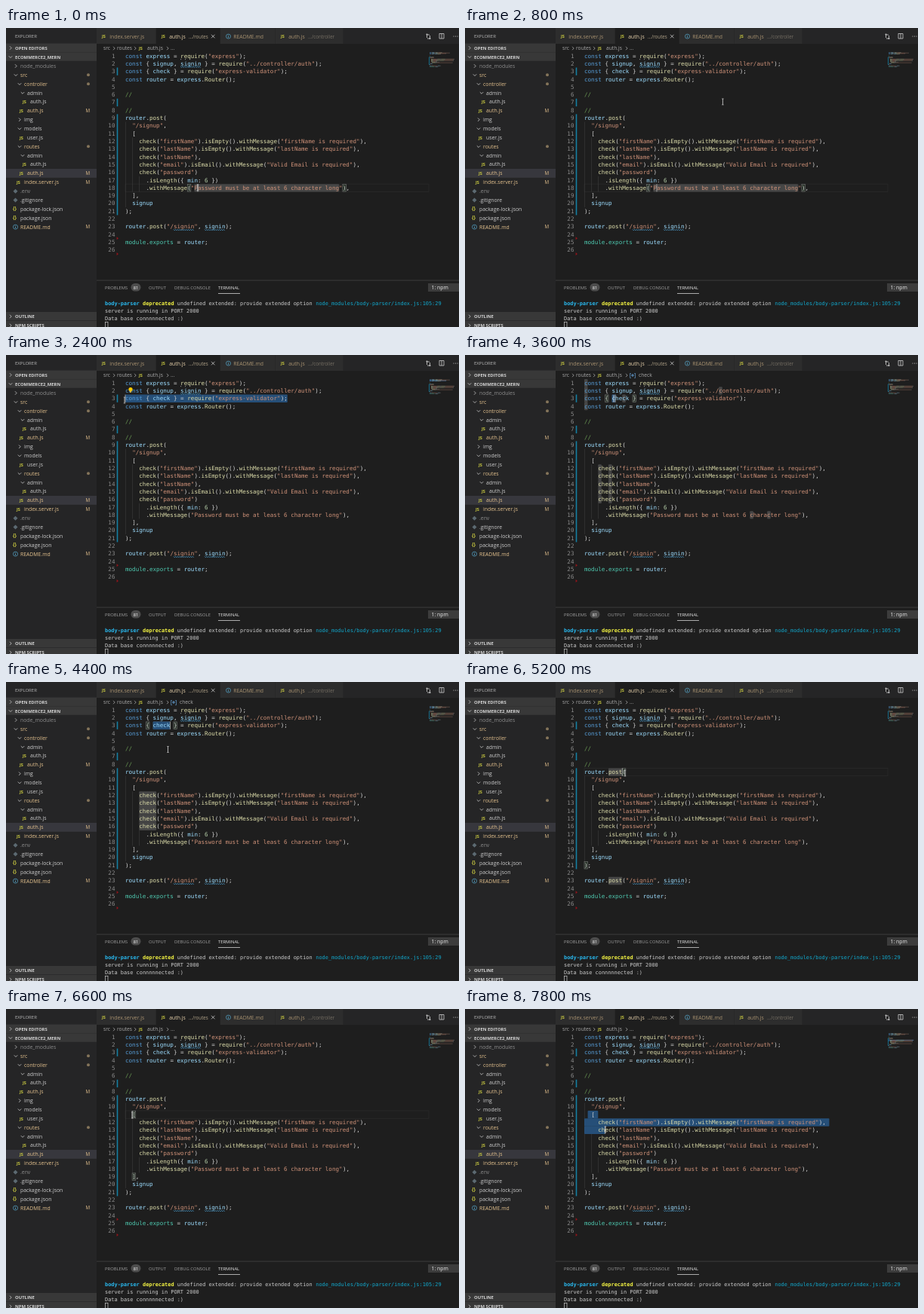
Write an HTML page with a canvas that moves like this. It is 600 px wide and 397 px high and loops after 8 s.

```html
<!DOCTYPE html>
<html lang="en">
<head>
<meta charset="utf-8">
<title>Code editor</title>
<style>
  html, body { margin: 0; width: 100%; height: 100%; overflow: hidden; background: #1e1e1e; }
  canvas { display: block; }
</style>
</head>
<body>
<canvas id="stage" width="600" height="397"></canvas>
<script>
const ctx = document.getElementById('stage').getContext('2d');
const DURATION = 8000, STEP = 200;
const UI = '"Open Sans", sans-serif', MONO = '"DejaVu Sans Mono", monospace';
const CODE_X = 158, CODE_Y = 31.9, CHAR = 4.57, LINE = 10.31, CODE_SIZE = 7.591;
const ORANGE = '#e2c08d', GREY = '#cccccc', DIM = '#8c8c8c', YELLOW = '#cbcb41', BLUE = '#519aba';

const code = `const express = require("express");
const { signup, signin } = require("../controller/auth");
const { check } = require("express-validator");
const router = express.Router();

//

//
router.post(
  "/signup",
  [
    check("firstName").isEmpty().withMessage("firstName is required"),
    check("lastName").isEmpty().withMessage("lastName is required"),
    check("lastName"),
    check("email").isEmail().withMessage("Valid Email is required"),
    check("password")
      .isLength({ min: 6 })
      .withMessage("Password must be at least 6 character long"),
  ],
  signup
);

router.post("/signin", signin);

module.exports = router;
`.split('\n');

// Each row: indent x, name, kind, status (M = changed file, dot = changed folder)
const tree = [
  [19, 'node_modules', 'closed', 'ignored'], [19, 'src', 'open', 'dot'],
  [24, 'controller', 'open', 'dot'], [28, 'admin', 'open'], [32, 'auth.js', 'js'],
  [28, 'auth.js', 'js', 'M'], [24, 'img', 'closed'], [24, 'models', 'open'],
  [28, 'user.js', 'js'], [24, 'routes', 'open', 'dot'], [28, 'admin', 'open'],
  [32, 'auth.js', 'js'], [28, 'auth.js', 'js', 'M'], [24, 'index.server.js', 'js', 'M'],
  [19, '.env', 'git', 'ignored'], [19, '.gitignore', 'git'],
  [19, 'package-lock.json', 'json'], [19, 'package.json', 'json'], [19, 'README.md', 'info', 'M']
];

function occurrences(word) {
  return code.flatMap((text, row) =>
    [...text.matchAll(new RegExp(word, 'g'))].map(m => [row, m.index, m.index + word.length]));
}

// Ranges are [row, first column, end column]; carets and brackets are [row, column].
const braces = [[2, 6], [2, 14]];
const states = [
  { at: 0, caret: [17, 21], marks: [[17, 20, 62]], brackets: [[17, 18], [17, 63]] },
  { at: 1400, caret: [2, 47] },
  { at: 1600, caret: [3, 1], selection: [[2, 47, 48], [3, 0, 1]] },
  { at: 1800, caret: [2, 0], selection: [[2, 0, 47]] },
  { at: 2200, caret: [2, 0], selection: [[2, 0, 47]], bulb: true },
  { at: 3400, caret: [2, 8], brackets: braces, symbol: true },
  { at: 3600, caret: [2, 9], selection: [[2, 8, 9]], marks: occurrences('c'), brackets: braces, symbol: true },
  { at: 3800, caret: [2, 13], selection: [[2, 8, 13]], marks: occurrences('check'), brackets: braces, symbol: true },
  { at: 5000, caret: [8, 11], marks: occurrences('post'), brackets: [[8, 11], [20, 0]] },
  { at: 6400, caret: [10, 2], brackets: [[10, 2], [18, 2]] },
  { at: 7400, caret: [10, 3], selection: [[10, 1, 3]] },
  { at: 7600, caret: [11, 5], selection: [[10, 1, 4], [11, 0, 5]] },
  { at: 7800, caret: [12, 6], selection: [[10, 1, 4], [11, 0, 71], [12, 0, 6]] }
];
const pointer = [
  [0, 254, 212], [1200, 372, 58], [1400, 372, 58], [1600, 162, 69], [2400, 157, 60],
  [3200, 194, 58], [3600, 197, 58], [4000, 217, 58], [4800, 212, 121], [5200, 212, 121],
  [6400, 168, 141], [7200, 163, 141], [7800, 186, 160], [8000, 188, 165]
];

function rect(x, y, w, h, color) {
  ctx.fillStyle = color;
  ctx.fillRect(x, y, w, h);
}
function pill(x, y, w, h, r, color) {
  ctx.fillStyle = color;
  ctx.beginPath();
  ctx.roundRect(x, y, w, h, r);
  ctx.fill();
}
function text(str, x, y, color, size = 6.85, font = UI, weight = 400) {
  ctx.font = `${weight} ${size}px ${font}`;
  ctx.fillStyle = color;
  ctx.fillText(str, x, y);
}
function path(points, color, width = 0.8) {
  ctx.strokeStyle = color;
  ctx.lineWidth = width;
  ctx.beginPath();
  points.forEach(([x, y]) => ctx.lineTo(x, y));
  ctx.stroke();
}
function disc(x, y, r, color) {
  ctx.fillStyle = color;
  ctx.beginPath();
  ctx.arc(x, y, r, 0, 7);
  ctx.fill();
}
function ring(x, y, r, color) {
  ctx.strokeStyle = color;
  ctx.lineWidth = 0.8;
  ctx.beginPath();
  ctx.arc(x, y, r, 0, 7);
  ctx.stroke();
}
function chevron(x, y, open, color = GREY) {
  path(open ? [[x - 2.2, y - 1], [x, y + 1.2], [x + 2.2, y - 1]]
            : [[x - 1, y - 2.2], [x + 1.2, y], [x - 1, y + 2.2]], color);
}
function icon(kind, x, y) {
  if (kind === 'js') text('JS', x, y + 2.1, YELLOW, 5.6, UI, 700);
  if (kind === 'json') text('{}', x, y + 1.9, YELLOW, 6.2, UI, 700);
  if (kind === 'git') {
    ctx.fillStyle = '#5c6a72';
    ctx.beginPath();
    [[3.5, -3], [6.5, 0], [3.5, 3], [0.5, 0]].forEach(([dx, dy]) => ctx.lineTo(x + dx, y + dy));
    ctx.fill();
  }
  if (kind === 'info') {
    ring(x + 3.5, y, 3, BLUE);
    rect(x + 3.1, y - 1.7, 0.9, 0.9, BLUE);
    rect(x + 3.1, y - 0.3, 0.9, 2.1, BLUE);
  }
}

function drawSidebar() {
  rect(0, 0, 120, 397, '#252526');
  text('EXPLORER', 12, 13.4, '#bbbbbb', 6);
  const sections = [['OPEN EDITORS', 26.5], ['ECOMMERCE2_MERN', 38.3, true], ['OUTLINE', 383], ['NPM SCRIPTS', 395]];
  for (const [name, y, open] of sections) {
    rect(0, y - 6, 120, 11.4, '#383838');
    chevron(6, y, open);
    text(name, 12, y + 2.2, '#d4d4d4', 5.9, UI, 700);
  }
  rect(0, 187, 120, 11.8, '#37373d');
  tree.forEach(([x, name, kind, status], i) => {
    const y = 50.5 + i * 11.87;
    const color = status === 'ignored' ? DIM : status ? ORANGE : GREY;
    if (kind === 'open' || kind === 'closed') chevron(x - 6, y, kind === 'open');
    else icon(kind, x - 10, y);
    text(name, x, y + 2.4, color);
    if (status === 'M') text('M', 105.5, y + 2.3, ORANGE, 6.2);
    if (status === 'dot') disc(109, y, 2, '#84745a');
  });
}

function drawTabs() {
  rect(120, 0, 480, 21, '#252526');
  const tabs = [
    [120, 79, 'js', 'index.server.js'], [199, 85, 'js', 'auth.js', '.../routes'],
    [284, 73, 'info', 'README.md'], [357, 90, 'js', 'auth.js', '.../controller']
  ];
  tabs.forEach(([x, w, kind, name, folder], i) => {
    const active = i === 1;
    rect(x, 0, w - 0.6, 21, active ? '#1e1e1e' : '#2d2d2d');
    icon(kind, x + 7, 11.1);
    text(name, x + 17.3, 13.6, active ? '#e8d2ac' : '#a89270');
    if (folder) text(folder, x + 43, 13.6, active ? '#b0a288' : '#777065', 6.2);
  });
  path([[272, 8.8], [276.5, 13.3]], GREY);
  path([[276.5, 8.8], [272, 13.3]], GREY);
  // Editor actions
  path([[561, 9], [557.5, 9], [557.5, 13]], GREY);
  path([[558, 14], [561.5, 14], [561.5, 10]], GREY);
  disc(557.5, 8.5, 1, GREY);
  disc(561.5, 14, 1, GREY);
  path([[574, 7.5], [580, 7.5], [580, 14], [574, 14], [574, 7.2]], GREY);
  path([[577, 7.5], [577, 14]], GREY);
  [593, 595.5, 598].forEach(x => disc(x, 11, 0.6, GREY));
}

function drawBreadcrumbs(symbol) {
  const color = '#a9a9a9';
  text('src', 129, 29.2, color, 6.7);
  text('routes', 147, 29.2, color, 6.7);
  icon('js', 176, 27);
  text('auth.js', 187, 29.2, color, 6.7);
  [143, 171, 214].forEach(x => chevron(x, 27, false, color));
  if (!symbol) return text('...', 218, 29.2, color, 6.7);
  text('[', 218, 29, '#75beff', 6.5);
  ring(222, 27, 1.2, '#75beff');
  text(']', 224, 29, '#75beff', 6.5);
  text('check', 230, 29.2, color, 6.7);
}

const rowTop = row => CODE_Y + row * LINE;
const colX = col => CODE_X + col * CHAR;
const tokenPattern = /"[^"]*"|\/\/.*|\w+(?=\()|\w+|[^\w\s"]/g;

function tokenColor(token, next) {
  if (token[0] === '"') return '#ce9178';
  if (token.startsWith('//')) return '#6a9955';
  if (token === 'const') return '#569cd6';
  if (token === 'module' || token === 'exports') return '#4ec9b0';
  if (/^\d/.test(token)) return '#b5cea8';
  if (!/\w/.test(token)) return '#d4d4d4';
  return next === '(' ? '#dcdcaa' : '#9cdcfe';
}

function eachToken(draw) {
  code.forEach((line, row) => {
    for (const m of line.matchAll(tokenPattern)) {
      draw(m[0], row, m.index, tokenColor(m[0], line[m.index + m[0].length]));
    }
  });
}

function squiggle(row, from, to) {
  const y = rowTop(row) + 9.4, points = [];
  for (let x = colX(from), i = 0; x <= colX(to); x += 1.4, i++) points.push([x, y + (i % 2 ? 0.7 : -0.7)]);
  path(points, '#4c9fd0', 0.8);
}

function drawCode(state) {
  const active = state.caret[0];
  if (!state.selection) {
    ctx.strokeStyle = '#2a2a2a';
    ctx.lineWidth = 0.8;
    ctx.strokeRect(CODE_X, rowTop(active), 402, LINE);
  }
  const guide = (col, from, to) => rect(colX(col), rowTop(from), 0.5, (to - from + 1) * LINE, '#404040');
  guide(0, 9, 19);
  guide(2, 11, 17);
  guide(4, 16, 17);

  const fillRanges = (ranges = [], color) => ranges.forEach(([row, a, b]) =>
    pill(colX(a), rowTop(row), (b - a) * CHAR, LINE + 0.1, 1, color));
  fillRanges(state.marks, '#464646');
  fillRanges(state.selection, '#264f78');
  (state.brackets || []).forEach(([row, col]) => {
    rect(colX(col), rowTop(row) + 0.3, CHAR, LINE - 0.6, '#263026');
    ctx.strokeStyle = '#7a7a7a';
    ctx.lineWidth = 0.6;
    ctx.strokeRect(colX(col), rowTop(row) + 0.4, CHAR, LINE - 0.8);
  });

  code.forEach((_, row) => {
    const number = String(row + 1);
    text(number, 144.5 - number.length * CHAR, rowTop(row) + 7.7, '#8a8a8a', CODE_SIZE, MONO);
  });
  eachToken((token, row, col, color) =>
    text(token, colX(col), rowTop(row) + 7.7, color, CODE_SIZE, MONO));

  [[2, 2], [6, 6], [8, 20]].forEach(([a, b]) =>
    rect(146.7, rowTop(a), 1.6, (b - a + 1) * LINE, '#157fa3'));
  [24, 26].forEach(row => {
    const y = rowTop(row);
    ctx.fillStyle = '#94151b';
    ctx.beginPath();
    [[146.6, y - 2], [149, y], [146.6, y + 2]].forEach(p => ctx.lineTo(...p));
    ctx.fill();
  });
  [16, 17.3, 18.6].forEach(col => rect(colX(col), rowTop(0) + 9.2, 1, 1, '#a0a0a0'));
  squiggle(1, 16, 22);
  squiggle(22, 14, 20);
  squiggle(22, 23, 29);

  if (state.bulb) {
    disc(165, 45.5, 2.6, '#ffcc00');
    rect(164, 47.5, 2, 2.3, '#d8b43c');
  }
  rect(colX(state.caret[1]) - 0.4, rowTop(active), 0.8, LINE, '#aeafad');
}

function drawMinimap(state) {
  const x = 561, y = 32, charW = 0.47, lineH = 0.81;
  (state.selection || []).forEach(([row, a, b]) =>
    rect(x + a * charW, y + row * lineH, (b - a) * charW, 1, '#264f78'));
  ctx.globalAlpha = 0.55;
  eachToken((token, row, col, color) =>
    rect(x + col * charW, y + row * lineH, token.length * charW, 0.6, color));
  ctx.globalAlpha = 1;
  rect(x - 1, y + 8 * lineH, 0.8, 13 * lineH, '#157fa3');
}

function drawPanel() {
  rect(120, 335, 480, 62, '#1e1e1e');
  rect(120, 334.7, 480, 0.7, '#4a4a4a');
  const labels = [['PROBLEMS', 131], ['OUTPUT', 189], ['DEBUG CONSOLE', 223], ['TERMINAL', 281]];
  labels.forEach(([label, x]) => text(label, x, 346.7, x === 281 ? '#e7e7e7' : '#a0a0a0', 5.85));
  rect(281, 352, 29, 0.8, '#d0d0d0');
  pill(165.5, 339, 13, 10.5, 5.2, '#4d4d4d');
  text('81', 168.7, 346.6, '#ffffff', 5.8);
  rect(559, 339, 41, 11, '#3c3c3c');
  text('1: npm', 563.5, 347, '#f0f0f0', 6.85);

  const width = 4.168, size = 6.923;
  const put = (str, col, row, color, weight) =>
    text(str, 131 + col * width, 367.7 + row * 9.9, color, size, MONO, weight);
  put('body-parser', 0, 0, '#29b8ee', 700);
  put('deprecated', 12, 0, '#f5f543', 700);
  put('undefined extended: provide extended option', 23, 0, '#cccccc');
  put('node_modules/body-parser/index.js:105:29', 67, 0, '#11a8cd');
  put('server is running in PORT 2000', 0, 1, '#cccccc');
  put('Data base connnnnected :)', 0, 2, '#cccccc');
  ctx.strokeStyle = '#cccccc';
  ctx.lineWidth = 0.7;
  ctx.strokeRect(131.4, 390.3, 3.6, 8);
}

function drawPointer(time) {
  const i = pointer.findIndex(p => p[0] > time);
  const [t0, x0, y0] = pointer[i - 1], [t1, x1, y1] = pointer[i];
  const k = (time - t0) / (t1 - t0), ease = k * k * (3 - 2 * k);
  const x = x0 + (x1 - x0) * ease, y = y0 + (y1 - y0) * ease;
  path([[x, y - 4], [x, y + 4]], '#d8d8d8', 0.8);
  [-4, 4].forEach(dy => path([[x - 1.3, y + dy], [x + 1.3, y + dy]], '#d8d8d8', 0.6));
}

function frame(now) {
  const time = Math.floor(now % DURATION / STEP) * STEP;
  const state = states.findLast(s => s.at <= time);
  rect(0, 0, 600, 397, '#1e1e1e');
  drawSidebar();
  drawTabs();
  drawBreadcrumbs(state.symbol);
  drawCode(state);
  drawMinimap(state);
  drawPanel();
  drawPointer(time);
  requestAnimationFrame(frame);
}
requestAnimationFrame(frame);
</script>
</body>
</html>
```
